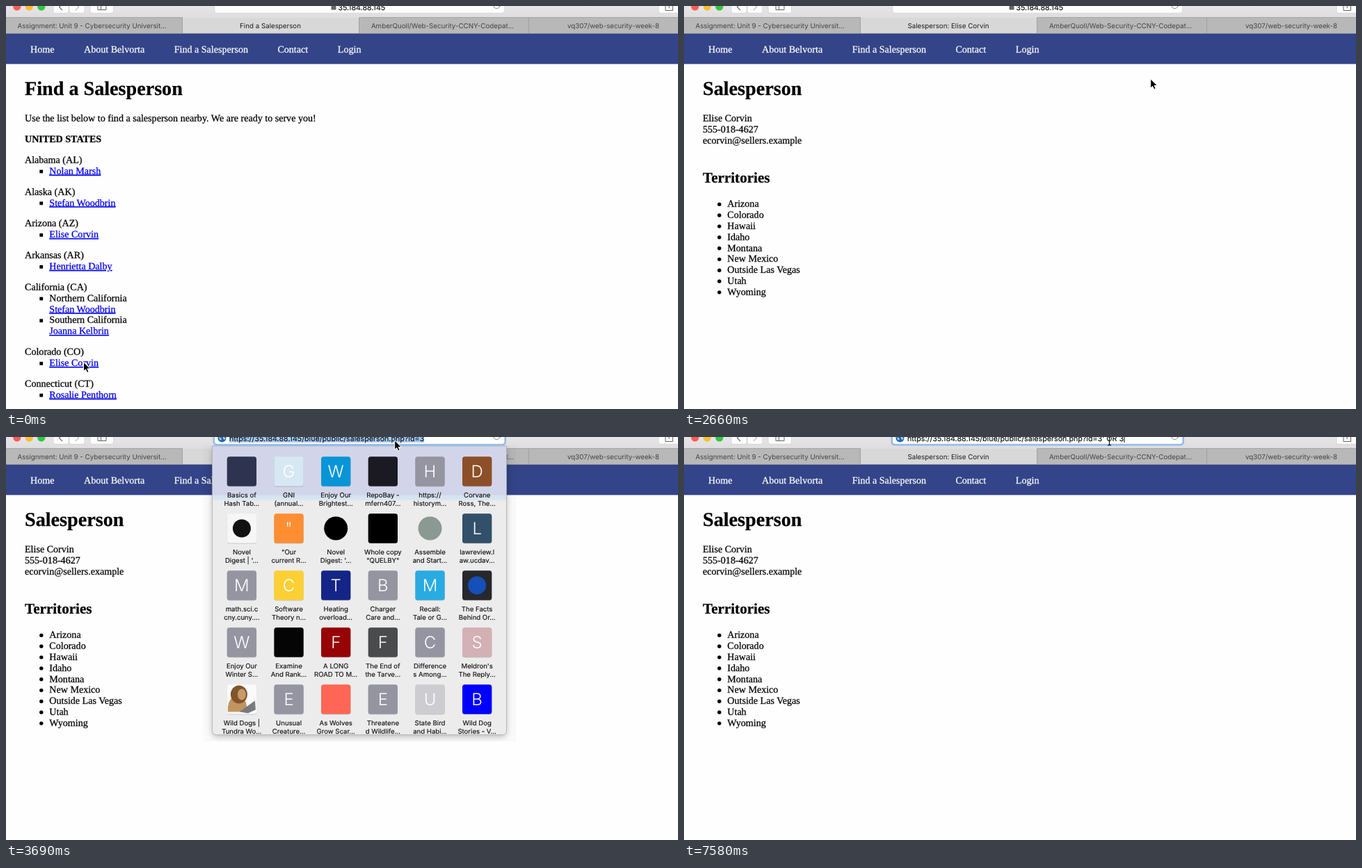
An HTML page that plays this animation: 966x580 px, repeating every 8 s.

```html
<!DOCTYPE html>
<html lang="en">
<head>
<meta charset="utf-8">
<title>Find a Salesperson</title>
<style>
  html, body { margin: 0; width: 100%; height: 100%; overflow: hidden; background: #fefefe; }
  svg { display: block; width: 966px; height: 580px; }
  text { white-space: pre; text-rendering: geometricPrecision; }
  .page text { font: 14.08px "Liberation Serif", "Times New Roman", serif; stroke: #000; stroke-width: .25px; }
  .page .h1 { font-size: 28.16px; font-weight: 700; }
  .page .h2 { font-size: 21.12px; font-weight: 700; }
  .page .bold { font-weight: 700; }
  .page .link { fill: #0000ee; stroke: #0000ee; text-decoration: underline; }
  .page .nav { fill: #fff; stroke: #fff; }
  .ui { font-family: Inter, Roboto, sans-serif; }
  .tab { font-size: 9.75px; fill: #444; text-anchor: middle; }
  .active { fill: #1e1e1e; }
  .label { font-size: 9.6px; fill: #111; stroke: #111; stroke-width: .15px; text-anchor: middle; }
  .glyph { font-size: 24px; font-weight: 300; fill: #fff; text-anchor: middle; }
  .url { font-size: 10.7px; fill: #111; stroke: #111; stroke-width: .15px; }
</style>
</head>
<body>
<svg id="stage" viewBox="0 0 966 580" xmlns="http://www.w3.org/2000/svg">
  <defs>
    <linearGradient id="tint" gradientUnits="userSpaceOnUse" x1="0" y1="13" x2="0" y2="429">
      <stop offset="0" stop-color="#d2d5e9"/><stop offset=".168" stop-color="#d2d5e9"/>
      <stop offset=".172" stop-color="#d3e3f1"/><stop offset=".184" stop-color="#d8e5f0"/>
      <stop offset=".19" stop-color="#ececec"/><stop offset="1" stop-color="#ececec"/>
    </linearGradient>
    <linearGradient id="bar" x1="0" y1="0" x2="0" y2="1">
      <stop offset="0" stop-color="#e6e4e6"/><stop offset="1" stop-color="#dfdddf"/>
    </linearGradient>
    <filter id="blur" x="-10%" y="-10%" width="120%" height="120%"><feGaussianBlur stdDeviation="5"/></filter>
    <clipPath id="halo"><rect x="284" y="12" width="449" height="426"/></clipPath>
  </defs>
  <rect width="966" height="580" fill="#fefefe"/>
  <g class="page">
    <rect y="40" width="966" height="43.500" fill="#334488"/>
    <g id="nav"></g><g id="list"></g><g id="person"></g>
  </g>
  <g id="chrome" class="ui"></g>
  <g id="pop" class="ui"></g>
  <g id="field" class="ui"></g>
  <g id="arrow"><path d="M0 0V13.2L3 10.4L5 15L7.4 14L5.4 9.5H9.6Z" fill="#000" stroke="#fff" stroke-width="1" stroke-linejoin="round"/></g>
  <g id="hand"><path d="M0 1.2C0-.6 2.6-.6 2.6 1.2V6.5C3.2 5.4 5 5.6 5.2 6.8C6 5.9 7.6 6.3 7.8 7.5C8.7 6.8 10 7.4 10 8.7V12C10 14 8.8 14.8 8.6 17H1.6C1.2 14.6-2 12.4-3.4 9.8C-3.9 8.6-2.4 7.8-1.4 8.8L0 10.3Z" fill="#fff" stroke="#000" stroke-width="1"/></g>
  <g id="beam"><path d="M-2.5-5.5Q0-5.5 0-3.5Q0-5.5 2.5-5.5M0-4V6M-2.5 7Q0 7 0 5Q0 7 2.5 7" fill="none" stroke="#111" stroke-width="1.1"/></g>
</svg>
<script>
const LOOP = 8000;
const $ = id => document.getElementById(id);

function add(parent, tag, attrs, content) {
  const el = document.createElementNS("http://www.w3.org/2000/svg", tag);
  for (const key in attrs) el.setAttribute(key, attrs[key]);
  if (content !== undefined) el.textContent = content;
  parent.appendChild(el);
  return el;
}
const rect = (p, x, y, width, height, fill, rx = 0, more = {}) => add(p, "rect", { x, y, width, height, fill, rx, ...more });
const circle = (p, cx, cy, r, fill, more = {}) => add(p, "circle", { cx, cy, r, fill, ...more });
const shape = (p, d, fill) => add(p, "path", { d, fill });
const line = (p, d, stroke, width = 1) => add(p, "path", { d, stroke, "stroke-width": width, fill: "none" });
const text = (p, x, y, str, cls = "") => add(p, "text", { x, y, class: cls }, str);
const show = (el, on) => el.setAttribute("visibility", on ? "visible" : "hidden");

// Web pages
const ROW = 15.84, GAP = 14.08;
const links = { Home: 35, "About Belvorta": 112, "Find a Salesperson": 241.7, Contact: 390.4, Login: 476.8 };
for (const name in links) text($("nav"), links[name], 67, name, "nav");

function buildList(g) {
  text(g, 27, 128.3, "Find a Salesperson", "h1");
  text(g, 27, 166, "Use the list below to find a salesperson nearby. We are ready to serve you!");
  text(g, 27, 196, "UNITED STATES", "bold");
  // a leading "-" marks a bullet, "@" a linked name
  const states = [
    ["Alabama (AL)", "-@Nolan Marsh"],
    ["Alaska (AK)", "-@Stefan Woodbrin"],
    ["Arizona (AZ)", "-@Elise Corvin"],
    ["Arkansas (AR)", "-@Henrietta Dalby"],
    ["California (CA)", "-Northern California", "@Stefan Woodbrin", "-Southern California", "@Joanna Kelbrin"],
    ["Colorado (CO)", "-@Elise Corvin"],
    ["Connecticut (CT)", "-@Rosalie Penthorn"],
  ];
  let y = 196 + ROW + GAP;
  for (const lines of states) {
    lines.forEach((str, i) => {
      if (str[0] === "-") rect(g, 48.3, y - 6, 4.8, 4.8, "#000");
      text(g, i ? 62.3 : 27, y, str.replace(/^-?@?/, ""), str.includes("@") ? "link" : "");
      y += ROW;
    });
    y += GAP;
  }
}

function buildPerson(g) {
  text(g, 27, 128.3, "Salesperson", "h1");
  ["Elise Corvin", "555-018-4627", "ecorvin@sellers.example"]
    .forEach((str, i) => text(g, 27, 166 + i * ROW, str));
  text(g, 27, 254.3, "Territories", "h2");
  ["Arizona", "Colorado", "Hawaii", "Idaho", "Montana", "New Mexico", "Outside Las Vegas", "Utah", "Wyoming"]
    .forEach((str, i) => {
      const y = 289.2 + i * ROW;
      circle(g, 50.8, y - 3.8, 2.7, "#000");
      text(g, 62.3, y, str);
    });
}
buildList($("list"));
buildPerson($("person"));

// Browser window
const chrome = $("chrome");
rect(chrome, 0, 0, 966, 17, "url(#bar)");
["#fc5b57", "#fdbc2e", "#2fc840"].forEach((c, i) => circle(chrome, 15.8 + i * 17.5, 1, 5.6, c));
for (const [x, w] of [[68, 22], [91, 22], [121, 33.5], [938, 40]])
  rect(chrome, x, -8, w, 18.3, "#fdfdfd", 3, { stroke: "#c9c7c9", "stroke-width": .6 });
line(chrome, "M81-3L76.5 1.5L81 6", "#707070", 1.2);
line(chrome, "M100-3L104.5 1.5L100 6", "#bdbdbd", 1.2);
line(chrome, "M132-3V5.5H144V-3M136.5-3V5.5", "#666");
line(chrome, "M948 0V6.5H958.5V0M953.2-4V3", "#666");
rect(chrome, 0, 17, 966, 23, "#b9b8b9");
rect(chrome, 254, 17, 253.5, 23, "#d9d8d9");
line(chrome, "M0 16.5H254M507.5 16.5H966", "#a6a5a6");
line(chrome, "M253.5 17V39M507.5 17V39M751.5 17V39", "#9f9e9f", .9);
line(chrome, "M0 39.5H966", "#93939b");
text(chrome, 123.5, 31.7, "Assignment: Unit 9 - Cybersecurity Universit...", "tab");
const title = text(chrome, 380, 31.7, "", "tab active");
text(chrome, 627.5, 31.7, "AmberQuoll/Web-Security-CCNY-Codepat...", "tab");
text(chrome, 873, 31.7, "vq307/web-security-week-8", "tab");

// Favourites panel: glyph or mark, tile colour, two label lines split by "~"
const GREY = "#9495a1", NONE = "none";
const tiles = [
  ["", "#2e3450", "Basics of~Hash Tab..."], ["G", "#d6e8f3", "GNI~(annual..."],
  ["W", "#0795d8", "Enjoy Our~Brightest..."], ["", "#1b1a22", "RepoBay -~mfern407..."],
  ["H", GREY, "https://~historym..."], ["D", "#8d4f28", "Corvane~Ross, The..."],
  ["#111", "#f6f6f6", "Novel~Digest | '..."], ["\"", "#ff8e33", "\"Our~current R..."],
  ["#000", NONE, "Novel~Digest: '..."], ["", "#000", "Whole copy~\"QUELBY\""],
  ["#8a9a92", NONE, "Assemble~and Start..."], ["L", "#33506b", "lawreview.l~aw.ucdav..."],
  ["M", GREY, "math.sci.c~cny.cuny...."], ["C", "#fcd034", "Software~Theory n..."],
  ["T", "#142587", "Heating~overload..."], ["B", GREY, "Charger~Care and..."],
  ["M", "#29abe2", "Recall:~Tale or G..."], ["#1450b8", "#27282d", "The Facts~Behind Or..."],
  ["W", GREY, "Enjoy Our~Winter S..."], ["", "#050505", "Examine~And Rank..."],
  ["F", "#960406", "A LONG~ROAD TO M..."], ["F", "#4a4b4d", "The End of~the Tarve..."],
  ["C", GREY, "Difference~s Among..."], ["S", "#d3b0b4", "Meldron's~The Reply..."],
  ["photo", "#fafafa", "Wild Dogs |~Tundra Wo..."], ["E", GREY, "Unusual~Creature..."],
  ["", "#ff6655", "As Wolves~Grow Scar..."], ["E", GREY, "Threatene~d Wildlife..."],
  ["U", "#cdcdd1", "State Bird~and Habi..."], ["B", "#0000fe", "Wild Dog~Stories - V..."],
];
const TILE = 42.3;

function drawPhoto(g, x, y) {
  const p = add(g, "g", { transform: `translate(${x} ${y})` });
  shape(p, "M-20 18Q-21 2-12-4L4 0Q10 12 5 18Z", "#c2945f");
  add(p, "ellipse", { cx: -4, cy: -7, rx: 12, ry: 13, fill: "#80542d" });
  add(p, "ellipse", { cx: 0, cy: -7, rx: 6, ry: 8, fill: "#c79a68" });
  shape(p, "M5 12L19 2L20 15L9 20L-3 18Z", "#777a7e");
}

function buildPanel(g) {
  const halo = add(g, "g", { "clip-path": "url(#halo)" });
  rect(halo, 284, 12, 449, 426, "#000", 0, { opacity: .02 });
  rect(halo, 297, 16, 422, 415, "#000", 6, { opacity: .28, filter: "url(#blur)" });
  add(g, "path", { d: "M296.5 13H719.5V422.5Q719.5 428.500 713.5 428.500H302.5Q296.5 428.500 296.5 422.5Z", fill: "url(#tint)", stroke: "#a9a9ad", "stroke-width": .7 });
  tiles.forEach(([mark, color, label], i) => {
    const x = 338.9 + (i % 6) * 67.65, y = 49.5 + Math.floor(i / 6) * 82;
    const left = x - TILE / 2, top = y - TILE / 2;
    if (color !== NONE) {
      rect(g, left, top + .9, TILE, TILE, "#000", 3.5, { opacity: .2 });
      rect(g, left, top, TILE, TILE, color, 3.5);
    }
    if (mark[0] === "#") circle(g, x, y, color === NONE ? 17 : 13, mark);
    else if (mark === "photo") drawPhoto(g, x, y);
    else text(g, x, y + 8.8, mark, "glyph");
    label.split("~").forEach((str, k) => text(g, x, y + 37.8 + k * 12, str, "label"));
  });
}
buildPanel($("pop"));

// Address field
const field = $("field");
const ring = rect(field, 299, -12, 418.5, 23, "none", 4, { stroke: "#8cbcf0", "stroke-width": 3 });
rect(field, 300, -12, 416.5, 22, "#fff", 3.5, { stroke: "#cfcdcf", "stroke-width": .5 });
const progress = rect(field, 301, 8.6, 0, 1.6, "#5b9fe0", .8);
const select = rect(field, 321, 0, 281, 8, "#a9cdf5");
const lock = add(field, "g", {});
rect(lock, 26.5, 0, 7, 5.6, "#666", .8);
const plus = add(field, "g", {});
circle(plus, 311, 1, 4.8, "none", { stroke: "#999", "stroke-width": .9 });
line(plus, "M308.5 1H313.5M311-1.5V3.5", "#999", .9);
const globe = add(field, "g", {});
circle(globe, 310.5, 1.5, 6, "#2468b4");
shape(globe, "M306 0Q309 1 310 3Q309 5 307.5 4.5ZM311-1Q315 0 315.5 3L313 4Q312 1 311-1Z", "#a9d3ea");
line(field, "M700.8-1A4.6 4.6 0 1 0 710-1M710 1V-2", "#888");
const url = add(field, "text", { y: 6, class: "url" });
const scheme = add(url, "tspan", {}, "https://");
add(url, "tspan", {}, "35.184.88.145");
const path = add(url, "tspan", {}, "/blue/public/salesperson.php?id=3");
const typed = add(url, "tspan", {}, "");
const caret = rect(field, 0, -2, 1, 10, "#111");

// Last entry whose time has passed
const at = (t, table) => table.reduce((v, [time, value]) => (t >= time ? value : v), table[0][1]);

// Pointer moves: start, end, number of held steps, curve points
const moves = [
  [450, 590, 2, [[111.5, 512.5], [118, 514], [121, 514]]],
  [890, 1930, 8, [[121, 514], [121, 514], [123, 420], [132, 180], [141, 75]]],
  [2070, 3100, 8, [[141, 75], [126, 190], [190, 314], [400, 290], [620, 150], [711, 45], [640, 10], [558.7, 5]]],
  [3840, 4140, 3, [[558.7, 5], [590, 5], [611.5, 5]]],
];

function along(pts, u) {
  const s = u * (pts.length - 1), i = Math.min(Math.floor(s), pts.length - 2), f = s - i;
  const p = k => pts[Math.max(0, Math.min(pts.length - 1, k))];
  return [0, 1].map(c => {
    const [a, b, d, e] = [p(i - 1)[c], p(i)[c], p(i + 1)[c], p(i + 2)[c]];
    return b + f * ((d - a) + f * ((2 * a - 5 * b + 4 * d - e) + f * (3 * (b - d) + e - a))) / 2;
  });
}

function pointer(t) {
  let pos = moves[0][3][0];
  for (const [start, end, n, pts] of moves) {
    if (t < start) break;
    const k = Math.floor((t - start + 8) / ((end - start) / (n - 1))) + 1;
    pos = along(pts, Math.min(k, n) / n);
  }
  return pos;
}

function draw(t) {
  const loaded = t >= 1190;
  show($("list"), !loaded);
  show($("person"), loaded);
  title.textContent = loaded ? "Salesperson: Elise Corvin" : "Find a Salesperson";

  const busy = t >= 890 && t < 2070;
  progress.setAttribute("width", busy ? 414.5 * Math.min(1, .1 + .9 * (t - 890) / 1030) : 0);

  // the host slides left while the rest of the address fades in
  const start = at(t, [[0, 441], [3390, 422], [3540, 355], [3690, 321]]);
  const fade = at(t, [[0, 0], [3390, .17], [3540, .6], [3690, 1]]);
  url.setAttribute("x", start);
  scheme.setAttribute("opacity", fade);
  for (const part of [scheme, path]) {
    part.setAttribute("fill-opacity", fade);
    part.setAttribute("stroke-opacity", fade);
  }
  lock.setAttribute("transform", `translate(${start} 0)`);
  lock.setAttribute("opacity", 1 - fade);
  show(ring, t >= 3240);
  show(plus, t >= 3240 && t < 3540);
  show(globe, t >= 3540);
  typed.textContent = at(t, [[0, ""], [5790, "'"], [6240, "' O"], [6530, "' OR"], [6830, "' OR "], [7430, "' OR 3"]]);
  const width = url.getComputedTextLength();
  show(select, t >= 3690 && t < 4290);
  select.setAttribute("width", width);
  show(caret, t >= 4290);
  caret.setAttribute("x", start + width + .5);

  show($("pop"), t >= 3540 && t < 5340);
  $("pop").setAttribute("opacity", t < 3690 ? .5 : 1);

  const kind = at(t, [[0, "arrow"], [450, "hand"], [1190, "arrow"], [3840, "beam"]]);
  const [x, y] = pointer(t);
  for (const id of ["arrow", "hand", "beam"]) {
    show($(id), id === kind);
    $(id).setAttribute("transform", `translate(${x} ${y})`);
  }
}

const begin = performance.now();
function frame() {
  draw((performance.now() - begin) % LOOP);
  requestAnimationFrame(frame);
}
frame();
</script>
</body>
</html>
```
